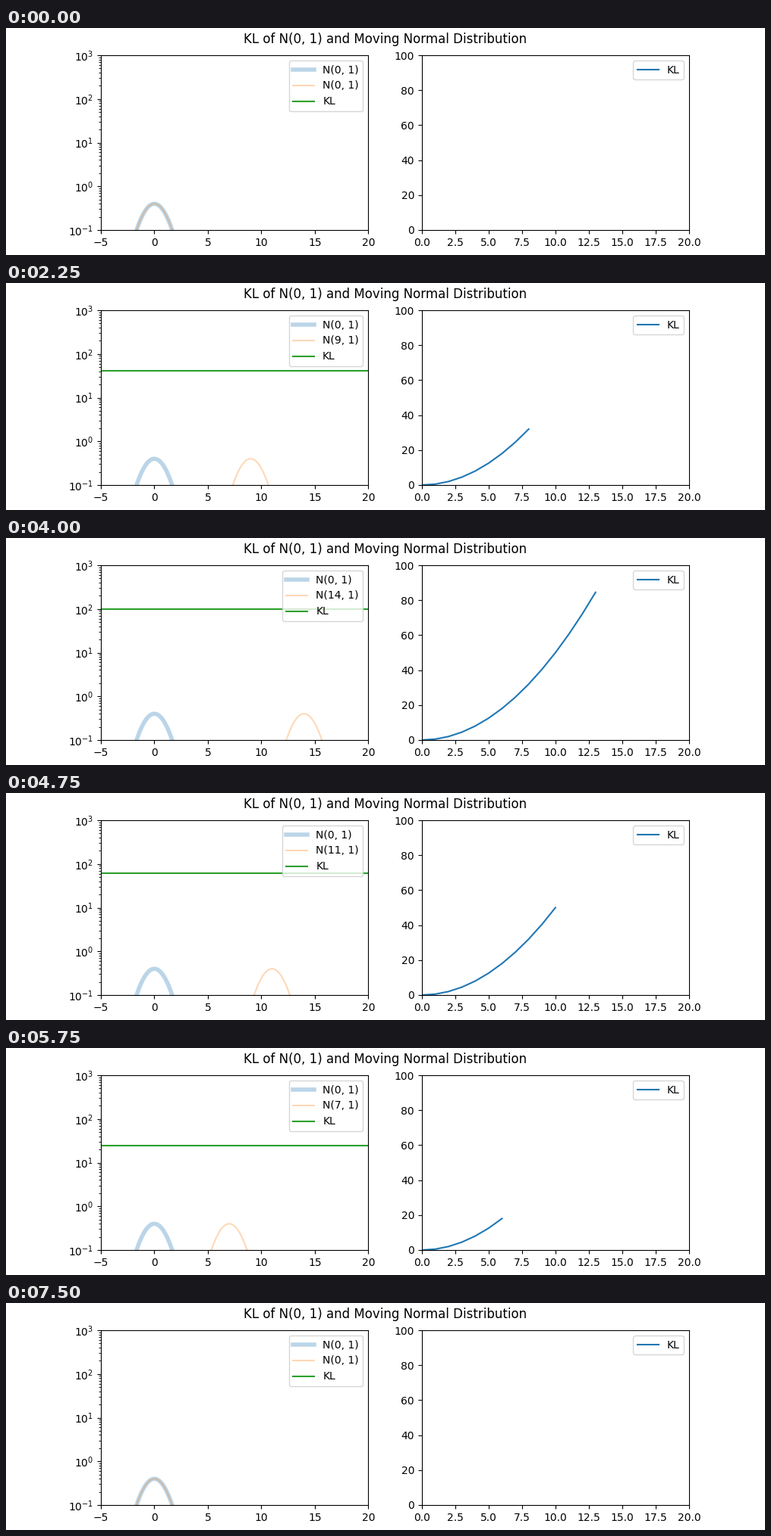
A matplotlib script that plays this animation: 1000 px wide and 300 px high, repeating every 7.75 s.

```python
import matplotlib.pyplot as plt
import numpy as np
from matplotlib.animation import FuncAnimation

plt.rcParams["font.family"] = "DejaVu Sans"

MAX_MEAN = 15
FRAMES = 2 * MAX_MEAN + 1
INTERVAL = 250


def normal_pdf(x, mean):
    return np.exp(-((x - mean) ** 2) / 2) / np.sqrt(2 * np.pi)


def kl_divergence(mean):
    """KL divergence between N(0, 1) and N(mean, 1)."""
    return mean**2 / 2


fig, (ax_pdf, ax_kl) = plt.subplots(1, 2, figsize=(10, 3), dpi=100)
fig.suptitle("KL of N(0, 1) and Moving Normal Distribution")

x = np.linspace(-5, 20, 501)
ax_pdf.set_yscale("log")
ax_pdf.set_xlim(-5, 20)
ax_pdf.set_ylim(0.1, 1000)
ax_pdf.plot(x, normal_pdf(x, 0), lw=4, alpha=0.3, label="N(0, 1)")
(moving_line,) = ax_pdf.plot(x, normal_pdf(x, 0), alpha=0.3)
(level_line,) = ax_pdf.plot([], [], label="KL")

ax_kl.set_xlim(0, 20)
ax_kl.set_ylim(0, 100)
(history_line,) = ax_kl.plot([], [], label="KL")
ax_kl.legend(loc="upper right")


def update(frame):
    mean = MAX_MEAN - abs(MAX_MEAN - frame)
    moving_line.set_ydata(normal_pdf(x, mean))
    moving_line.set_label(f"N({mean}, 1)")
    level_line.set_data(x, np.full_like(x, kl_divergence(mean)))
    ax_pdf.legend(loc="upper right")

    # The history holds only the means already passed.
    means = np.arange(mean)
    history_line.set_data(means, kl_divergence(means))
    return moving_line, level_line, history_line


anim = FuncAnimation(fig, update, frames=FRAMES, interval=INTERVAL,
                     init_func=lambda: update(0), repeat=True, repeat_delay=0)
plt.show()
```
